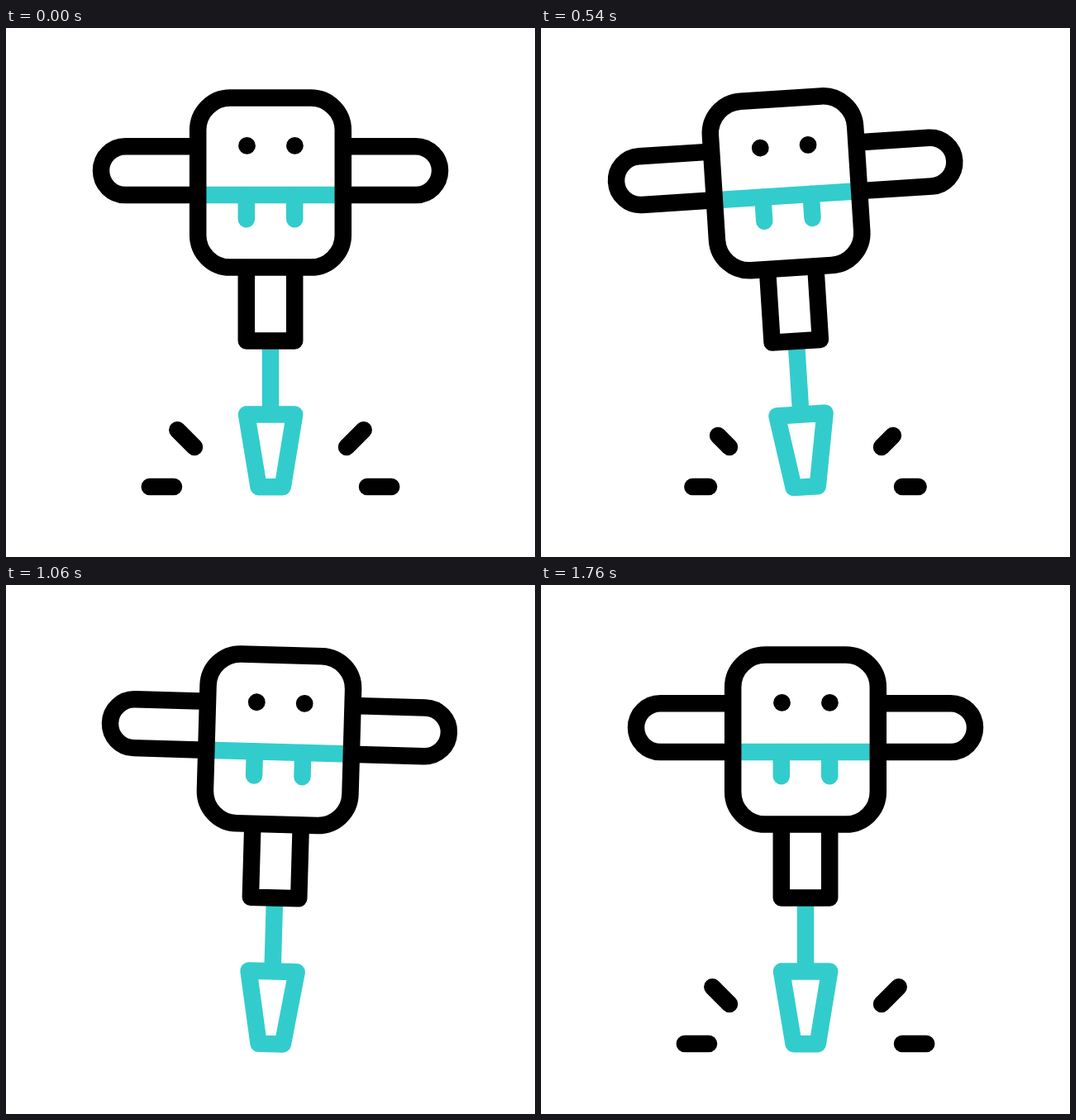
An HTML page with a canvas that plays this animation: 640x640 px, repeating every 2400 ms.

```html
<!DOCTYPE html>
<html lang="en">
<head>
<meta charset="utf-8">
<title>Jackhammer</title>
<style>
html, body { margin: 0; width: 100%; height: 100%; overflow: hidden; background: #fff; }
canvas { display: block; width: 640px; height: 640px; }
</style>
</head>
<body>
<canvas id="stage" width="640" height="640"></canvas>
<script>
const ctx = document.getElementById('stage').getContext('2d');
const BLACK = '#000', TEAL = '#33cccc';
const LOOP = 2400, STEP = 20;

// [step, degrees]: swings of the tool about the tip of its bit
const swing = [
  [0, 0], [3, 4.15], [7, -6.3], [12, 4.16], [17, -6.2], [22, 4.1], [26, -6.2],
  [30.1, 4.25], [37.15, -6.15], [42, 4.25], [46.5, -6.2], [52, 4.25],
  [56, -6.2], [62, 4.25], [68, -6.2], [73, 4.25], [77, -6.2], [81, 0]
];

// [step, head, tail]: part of each spark that is drawn, from inner to outer end
const heads = [[22.3, 0], [29.3, 1], [36.5, 1], [36.5, 0], [59.3, 0], [66.3, 1], [73.5, 1], [73.5, 0], [81, 0], [88, 1]];
const tails = [[5.1, 0], [12.1, 1], [12.1, 0], [29.3, 0], [36.5, 1], [36.5, 0], [66.3, 0], [73.5, 1], [73.5, 0]];

// [inner x, inner y, outer x, outer y]; mirrored for the right side
const sparks = [[203, 555, 173.8, 555], [228, 507, 207.3, 486.3]];

function track(keys, n) {
  if (n <= keys[0][0]) return keys[0][1];
  for (let i = 1; i < keys.length; i++) {
    const [a, v] = keys[i - 1], [b, w] = keys[i];
    if (n < b) return v + (w - v) * (n - a) / (b - a);
  }
  return keys[keys.length - 1][1];
}

function line(color, pts, cap = 'round', close = false) {
  ctx.strokeStyle = color;
  ctx.lineCap = cap;
  ctx.beginPath();
  pts.forEach(([x, y]) => ctx.lineTo(x, y));
  if (close) ctx.closePath();
  ctx.stroke();
}

function handle(side) {
  ctx.save();
  ctx.translate(320, 0);
  ctx.scale(side, 1);
  ctx.strokeStyle = BLACK;
  ctx.lineCap = 'butt';
  ctx.beginPath();
  ctx.moveTo(88, 143.2);
  ctx.lineTo(175.6, 143.2);
  ctx.arc(175.6, 172.6, 29.4, -Math.PI / 2, Math.PI / 2);
  ctx.lineTo(88, 202);
  ctx.stroke();
  ctx.restore();
}

function eye(x) {
  ctx.fillStyle = BLACK;
  ctx.beginPath();
  ctx.arc(x, 142.4, 10.4, 0, Math.PI * 2);
  ctx.fill();
}

function tool(deg) {
  ctx.save();
  ctx.translate(320, 555);
  ctx.rotate(deg * Math.PI / 180);
  ctx.translate(-320, -555);

  line(TEAL, [[320, 380], [320, 467]], 'butt');
  line(TEAL, [[291, 467.4], [349.2, 467.4], [334.8, 555.2], [305.6, 555.2]], 'round', true);
  line(TEAL, [[234, 202], [406, 202]], 'butt');
  for (const x of [290.8, 349.2]) line(TEAL, [[x, 202], [x, 231.2]]);

  handle(-1);
  handle(1);
  line(BLACK, [[290.8, 290], [290.8, 378.4], [349.2, 378.4], [349.2, 290]]);
  ctx.beginPath();
  ctx.roundRect(232.2, 84.6, 175.6, 205, 39);
  ctx.stroke();
  eye(291.5);
  eye(349.4);
  ctx.restore();
}

function drawSparks(n) {
  const head = n < 12.1 ? 1 : track(heads, n), tail = track(tails, n);
  if (head - tail < 0.001) return;
  for (const [ix, iy, ox, oy] of sparks) {
    const at = k => [ix + (ox - ix) * k, iy + (oy - iy) * k];
    const a = at(tail), b = at(head);
    line(BLACK, [a, b]);
    line(BLACK, [[640 - a[0], a[1]], [640 - b[0], b[1]]]);
  }
}

function draw(ms) {
  const n = Math.min(88, Math.floor((ms % LOOP) / STEP));
  ctx.fillStyle = '#fff';
  ctx.fillRect(0, 0, 640, 640);
  ctx.lineWidth = 20.5;
  ctx.lineJoin = 'round';
  tool(track(swing, n));
  drawSparks(n);
}

const start = performance.now();
function tick() {
  draw(performance.now() - start);
  requestAnimationFrame(tick);
}
tick();
</script>
</body>
</html>
```
